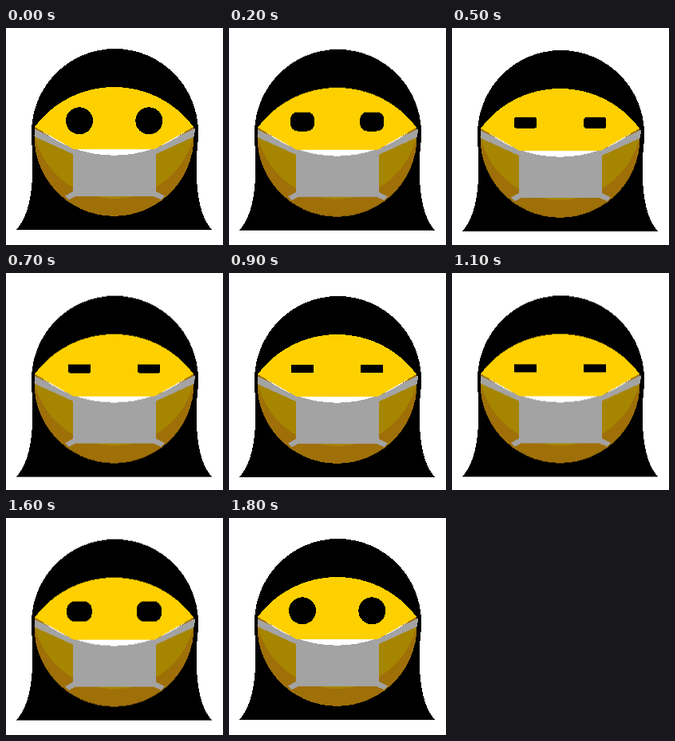
Recreate the animation shown at these times as an HTML page. Size 272x272 px, loop 2000 ms.

```html
<!DOCTYPE html>
<html lang="en">
<head>
<meta charset="utf-8">
<title>Masked face blinking</title>
<style>
html, body { margin: 0; height: 100%; overflow: hidden; background: #fff; }
svg { display: block; width: 100vw; height: 100vh; shape-rendering: crispEdges; }

/* Every segment moves in 100 ms steps (5% of the loop). */
.figure { animation: bob 2s infinite; }
.eye { animation: blink 2s infinite; }

@keyframes bob {
  0%   { transform: translateY(0); animation-timing-function: steps(4); }
  20%  { transform: translateY(1.5px); animation-timing-function: steps(3); }
  35%  { transform: translateY(2.6px); animation-timing-function: steps(2); }
  45%  { transform: translateY(3px); animation-timing-function: steps(1); }
  50%  { transform: translateY(3px); animation-timing-function: steps(1); }
  55%  { transform: translateY(2.4px); animation-timing-function: steps(3); }
  70%  { transform: translateY(1.2px); animation-timing-function: steps(4); }
  90%, 100% { transform: translateY(0); }
}
@keyframes blink {
  0%   { x: -17px; y: -17px; width: 34px; height: 34px; rx: 17px; animation-timing-function: steps(2); }
  10%  { x: -15px; y: -11.8px; width: 30px; height: 24px; rx: 9px; animation-timing-function: steps(2); }
  20%  { x: -14px; y: -6.6px; width: 28px; height: 14.4px; rx: 2px; animation-timing-function: steps(3); }
  35%  { x: -14px; y: -4.8px; width: 28px; height: 11px; rx: 1.5px; animation-timing-function: steps(2); }
  45%  { x: -14px; y: -4px; width: 28px; height: 9.6px; rx: .5px; animation-timing-function: steps(1); }
  50%  { x: -14px; y: -4px; width: 28px; height: 9.6px; rx: .5px; animation-timing-function: steps(1); }
  55%  { x: -14px; y: -4.4px; width: 28px; height: 10.2px; rx: .5px; animation-timing-function: steps(3); }
  70%  { x: -14.5px; y: -8.2px; width: 29px; height: 17.4px; rx: 4px; animation-timing-function: steps(4); }
  90%, 100% { x: -17px; y: -17px; width: 34px; height: 34px; rx: 17px; }
}
</style>
</head>
<body>
<svg viewBox="0 0 272 272">
  <g class="figure">
    <!-- hood -->
    <path d="M136.5 26C194 26 241 73 241 131C241 147 238.5 156 238.5 170C238.5 214 245 238 258 253H13C26 238 33.5 214 33.5 170C33.5 156 32 147 32 131C32 73 79 26 136.5 26Z"/>
    <!-- shaded lower face -->
    <path fill="#9f6f08" d="M36.2 124A100 100 0 1 0 234.8 124Z"/>
    <path fill="#a68500" d="M36 136A102.5 102.5 0 0 0 235 136Z"/>
    <!-- mask, straps and tabs -->
    <path fill="#a3a3a3" d="M35.5 126.5V136L84 158V205L74 210.5L79 215L86.5 211.3H185.5L194 215L199 210.5L188 205V158L236 136L237 125.5L221 133.5L188 151H84L50 133.5Z"/>
    <!-- mask rim and upper face -->
    <path fill="#fff" d="M46 129.8L84 151.6H187L225 129.8A149 149 0 0 1 46 129.8Z"/>
    <path fill="#ffd000" d="M36 124A124 124 0 0 1 235 124L187 151.6H84Z"/>
    <g transform="translate(92 116.3)"><rect class="eye"/></g>
    <g transform="translate(179.3 116.3)"><rect class="eye"/></g>
  </g>
</svg>
</body>
</html>
```
